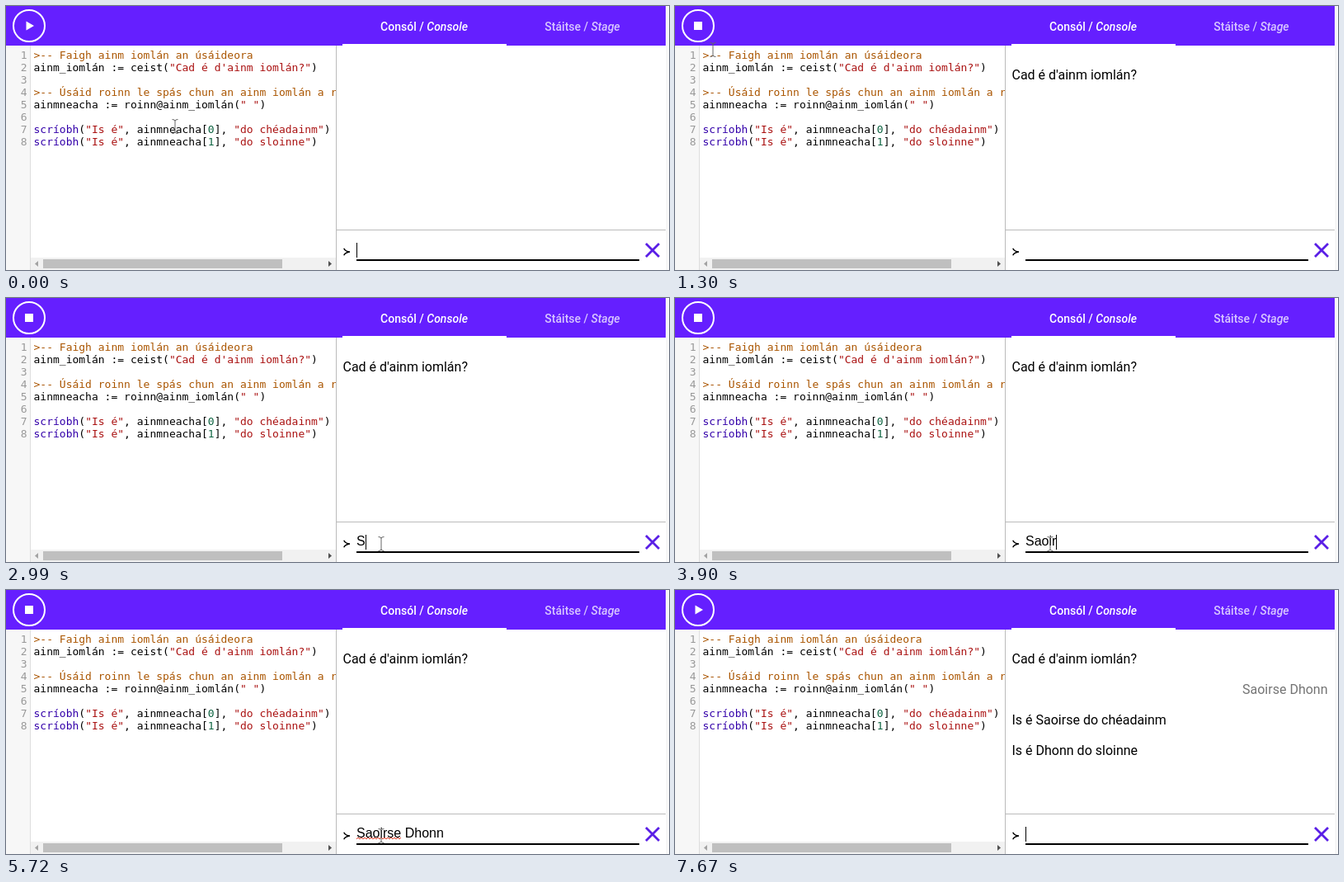
An HTML page that plays this animation: 804x320 px, repeating every 8060 ms.

```html
<!DOCTYPE html>
<html lang="ga">
<head>
<meta charset="utf-8">
<style>
  html, body { margin: 0; width: 100%; height: 100%; overflow: hidden; background: #fff; }
  svg { display: block; }
  text { white-space: pre; }
  .code { font: 13px "DejaVu Sans Mono", monospace; }
  .tab { font: 500 14px Roboto, sans-serif; fill: #fff; text-anchor: middle; }
  .out { font: 16px Roboto, sans-serif; }
  #typed { font: 16px "Liberation Sans", Arial, sans-serif; }
  .comment { fill: #a50; } .string { fill: #a11; } .builtin { fill: #30a; } .number { fill: #164; }
</style>
</head>
<body>
<svg width="804" height="320" viewBox="0 0 804 320">
  <!-- editor -->
  <svg width="400" height="320">
    <path d="M0 48H29V320H0z" fill="#f7f7f7"/>
    <path d="M29.5 48V320" stroke="#ddd"/>
    <g id="editor" class="code"></g>
    <path d="M30 305H400V320H30z" fill="#f1f1f1"/>
    <path d="M45 307H335V318H45z" fill="#bfbfbf"/>
    <path d="M39 309V316L35 312.5z" fill="#a3a3a3"/>
    <path d="M391 309V316L395 312.5z" fill="#505050"/>
  </svg>

  <!-- header -->
  <path d="M0 0H800V48H0z" fill="#651fff"/>
  <path d="M408 46H607V48H408z" fill="#fff"/>
  <circle cx="28" cy="24" r="19" fill="none" stroke="#fff" stroke-width="2"/>
  <path id="button" fill="#fff"/>
  <text class="tab" x="507" y="30">Consól / <tspan font-style="italic">Console</tspan></text>
  <text class="tab" x="699" y="30" opacity=".75">Stáitse / <tspan font-style="italic">Stage</tspan></text>

  <!-- console -->
  <path d="M400.5 48V320M401 271.5H800" stroke="#bbb" fill="none"/>
  <path d="M801.5 0V320" stroke="#eee"/>
  <text id="question" class="out" x="408.5" y="89">Cad é d'ainm iomlán?</text>
  <g id="answers" class="out">
    <text id="echo" x="791.5" y="126" text-anchor="end" fill="#757575"></text>
    <text id="first" x="408.5" y="163"></text>
    <text id="last" x="408.5" y="200"></text>
  </g>
  <path d="M409.7 293.7Q411.5 297.6 417 298Q411.5 298.4 409.7 302.3" fill="none" stroke="#000" stroke-width="1.4"/>
  <path d="M425 307H768V309H425z"/>
  <path d="M776 288L792 304M792 288L776 304" stroke="#5a1fe6" stroke-width="2.8"/>
  <text id="typed" x="425" y="300"></text>
  <path id="squiggle" fill="none" stroke="#e0402a"/>
  <path id="caret" d="M0 287H1V305H0z"/>

  <!-- mouse pointers, with the hot spot at 0,0 -->
  <g id="mouse">
    <path id="beam" d="M-3.5 -8.5Q0 -8.5 0 -6.5Q0 -8.5 3.5 -8.5M0 -6.5V6.5M-3.5 8.5Q0 8.5 0 6.5Q0 8.5 3.5 8.5" fill="none" stroke="#666"/>
    <path id="hand" d="M-1.5 1Q0 -1 1.5 1V6Q3 5 4 6.5Q5.5 5.5 6.5 7Q8.5 6.5 8.5 9V12L7 16H-1.5L-5.5 10Q-5.5 8 -3.5 8.5L-1.5 10.5z" fill="#fff" stroke="#222" stroke-width=".8"/>
    <path id="arrow" d="M0 0V15L3.5 12L6 17.5L8.2 16.5L5.8 11.2H10.5z" fill="#111" stroke="#fff" stroke-width=".8"/>
  </g>
</svg>
<script>
const LOOP = 8060, STEP = 130;
const RUN = 1040, ENTER = 5850;
const [firstName, lastName] = ['Saoirse', 'Dhonn'];
const fullName = firstName + ' ' + lastName;

const keyTimes = [2990, 3120, 3510, 3770, 3900, 4030, 4160, 4420, 4550, 4680, 4810, 4940, 5200];
const caretToggles = [0, 520, 1950, 2470, 2990, 5720, 5850, 6370, 6890, 7540, 7670];
const mousePath = [[0, 205, 146], [130, 205, 146], [650, 13, 33], [1170, 13, 33],
                   [1950, 461, 298], [2730, 461, 298], [2860, 455, 298]];

const PLAY = 'M24.5 18.5L34 24L24.5 29.5z';
const STOP = 'M23 19H33V29H23z';

const source = `>-- Faigh ainm iomlán an úsáideora
ainm_iomlán := ceist("Cad é d'ainm iomlán?")

>-- Úsáid roinn le spás chun an ainm iomlán a roinnt
ainmneacha := roinn@ainm_iomlán(" ")

scríobh("Is é", ainmneacha[0], "do chéadainm")
scríobh("Is é", ainmneacha[1], "do sloinne")`;

const $ = id => document.getElementById(id);
const show = (id, on) => $(id).setAttribute('visibility', on ? 'visible' : 'hidden');
const countUntil = (times, t) => times.filter(time => time <= t).length;

function highlight(line) {
  const token = /(?<comment>^>--.*)|(?<string>"[^"]*")|(?<builtin>scríobh)|(?<number>\d)/g;
  return line.replace(token, (text, ...rest) => {
    const groups = rest.at(-1);
    const kind = Object.keys(groups).find(key => groups[key]);
    return `<tspan class="${kind}">${text.replace('>', '&gt;')}</tspan>`;
  });
}

$('editor').innerHTML = source.split('\n').map((line, i) => {
  const y = 64 + 15 * i;
  return `<text x="25.5" y="${y}" text-anchor="end" fill="#999">${i + 1}</text>
          <text x="33.5" y="${y}">${highlight(line)}</text>`;
}).join('');
$('echo').textContent = fullName;
$('first').textContent = `Is é ${firstName} do chéadainm`;
$('last').textContent = `Is é ${lastName} do sloinne`;

function squigglePath(width) {
  let d = 'M425 302';
  for (let x = 2; x <= width; x += 2) d += `L${425 + x} ${x % 4 ? 300 : 302}`;
  return d;
}

function mouseAt(t) {
  const next = mousePath.findIndex(point => point[0] > t);
  if (next < 0) return mousePath.at(-1).slice(1);
  const [t0, x0, y0] = mousePath[next - 1], [t1, x1, y1] = mousePath[next];
  const p = (t - t0) / (t1 - t0), ease = p * p * (3 - 2 * p);
  return [x0 + (x1 - x0) * ease, y0 + (y1 - y0) * ease];
}

function pointerKind(x, y) {
  if (Math.hypot(x - 28, y - 24) < 20) return 'hand';
  const overCode = x > 30 && x < 400 && y > 48 && y < 305;
  const overInput = x > 425 && x < 768 && y > 280;
  return overCode || overInput ? 'beam' : 'arrow';
}

function draw(time) {
  const t = Math.floor(time % LOOP / STEP) * STEP;
  const running = t >= RUN && t < ENTER;
  const done = t >= ENTER;

  $('button').setAttribute('d', running ? STOP : PLAY);
  show('question', t >= RUN);
  show('answers', done);

  const typed = $('typed');
  typed.textContent = done ? '' : fullName.slice(0, countUntil(keyTimes, t));
  const length = typed.textContent.length;
  const width = length ? typed.getComputedTextLength() : 0;
  $('caret').setAttribute('transform', `translate(${Math.round(425 + width)})`);
  show('caret', countUntil(caretToggles, t) % 2);

  const misspelt = length > firstName.length;
  $('squiggle').setAttribute('d', misspelt ? squigglePath(typed.getSubStringLength(0, firstName.length)) : '');

  const [x, y] = mouseAt(t).map(Math.round);
  const kind = pointerKind(x, y);
  $('mouse').setAttribute('transform', `translate(${x} ${y})`);
  for (const id of ['beam', 'hand', 'arrow']) show(id, !done && id === kind);
}

const start = performance.now();
function tick() {
  draw(performance.now() - start);
  requestAnimationFrame(tick);
}
tick();
</script>
</body>
</html>
```
